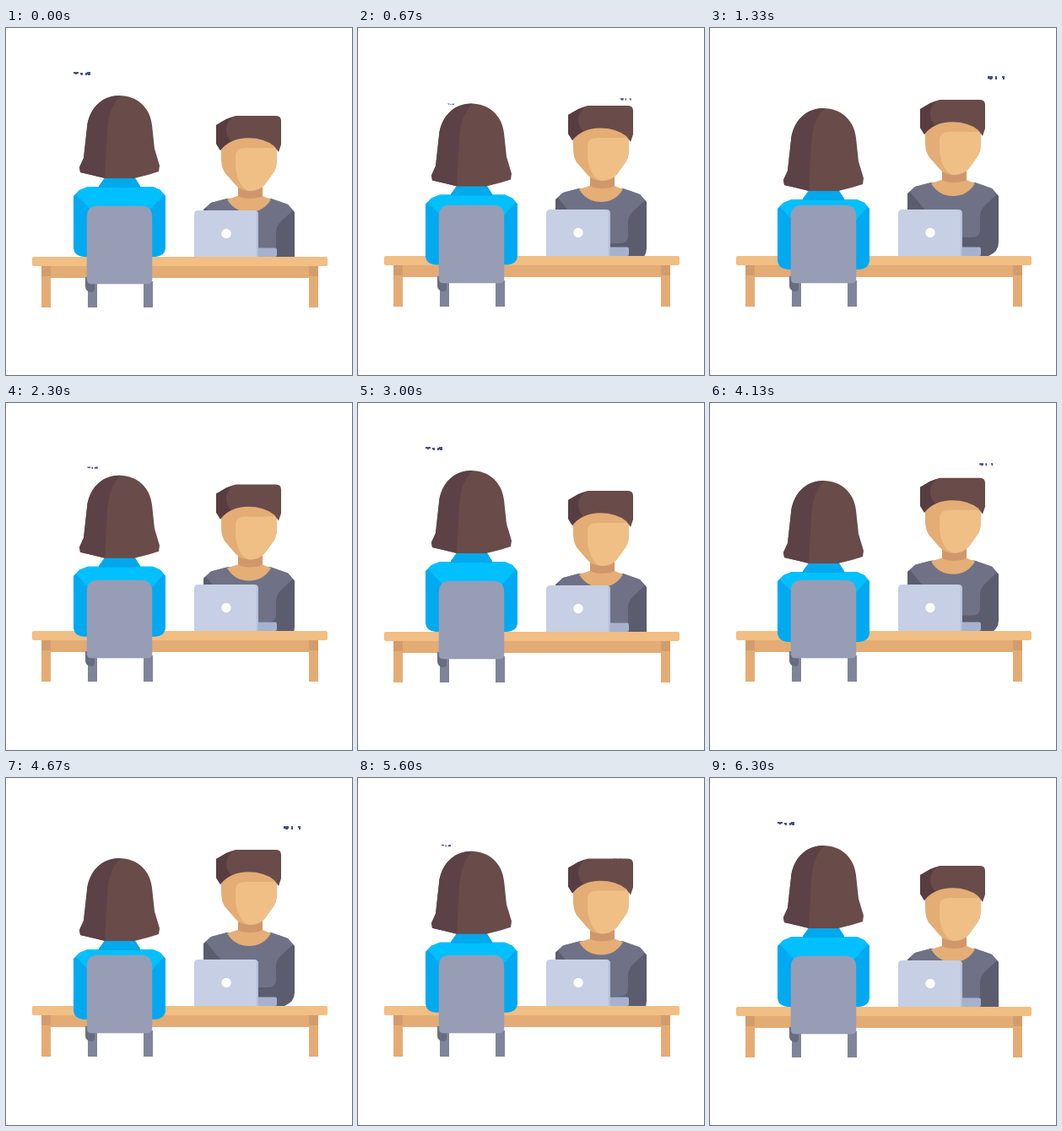
Animation, 410 px wide and 411 px high, one loop 6.66 s. Source, as an HTML page:

```html
<!DOCTYPE html>
<html lang="en">
<head>
<meta charset="utf-8">
<title>Interview</title>
<style>
  html, body { margin: 0; height: 100%; overflow: hidden; background: #fff; }
  svg { display: block; width: 410px; height: 411px; }
</style>
</head>
<body>
<svg viewBox="0 0 410 411">
  <g id="womanWords" fill="#43508a">
    <path d="M80 52h6v2h-2v1h-2v-1h-2zM88 53h3v3h-2v-1h-1zM94 53h2v-1h4v4h-3v-1h-1v1h-2z"/>
  </g>
  <g id="manWords" fill="#43508a">
    <path d="M329 57h6v3h-1v1h-3v-1h-2zM338 57h2v4h-2zM346 57h3v4h-2v-2h-1z"/>
  </g>

  <g id="man">
    <path fill="#5b5d6f" d="M234 215L243 207 262 202H314L334 209 342 218V273Q342 284 330 289H234z"/>
    <path fill="#6f7287" d="M243 207L262 202H314L334 209 340 216 325 230Q320 235 320 243V258Q320 267 310 267H256V240Q256 234 250 229L237 213z"/>
    <path fill="#e5ae76" d="M262 203L274 199H304L314 203Q305 218 288 218T262 203z"/>
    <path fill="#d0976b" d="M275 180H304V199Q299 202 289 202T275 199z"/>
    <path fill="#e3ad75" d="M255 140Q258 128 288 128T321 140V155Q321 166 317 171L307 185Q300 193 289 193T272 186L259 171Q255 164 255 155z"/>
    <path fill="#efbf85" d="M272 152Q272 142 283 142H321V155Q321 166 317 171L307 185Q300 193 289 193 280 191 276 181 272 172 272 162z"/>
    <path fill="#694b49" d="M249 115L261 108 272 104H320Q326 104 326 110V138L323 147 318 140Q306 130.300 287 130.300 266 130.300 254 145L249 137z"/>
    <path fill="#573d41" d="M249 115L261 108 269 105Q260 113 261 122 262 130 267 134 259 138 254 145L249 137z"/>
  </g>

  <g class="furniture">
    <path fill="#e3ac74" d="M42 282H370V331H359V296H53V331H42z"/>
    <path fill="#d29d6c" d="M42 282H53V294H42zM359 282H370V294H359z"/>
    <rect fill="#f1be83" x="31" y="271" width="350" height="11" rx="2"/>
    <rect fill="#a6b1cd" x="290" y="260.500" width="31" height="10.500" rx="2"/>
    <path fill="#c6cfe3" d="M223 271V221Q223 216 228 216H294Q299 216 299 221V271z"/>
    <path fill="#b4bed7" d="M297 217Q299 218 299 221V271H297z"/>
    <circle fill="#fff" cx="261" cy="243.500" r="5.700"/>
  </g>

  <g id="woman">
    <path fill="#00a9f0" d="M80 199L87 192 97 188H174L183 192 189 199V261Q188 270 177 271H92Q81 270 80 261z"/>
    <path fill="#00c0ff" d="M83 197L87 192 97 188H174L183 192 187 197 170 216H101z"/>
    <path fill="#00a8ec" d="M118 176H152L159 187V189H110V187z"/>
    <path fill="#694b49" d="M134 80C156 80 171 95 173 115L176 143 182 163 181 170 168 174 152 178H118L101 174 88 171 87 165 92 154 96 118C98 97 112 80 134 80z"/>
    <path fill="#5c4146" d="M136 80C126 89 121 103 120 122L117 178 101 174 88 171 87 165 92 154 96 118C98 97 112 80 136 80z"/>
  </g>

  <g class="furniture">
    <path fill="#7f849b" d="M97 300H108V331H97zM163 300H174V331H163z"/>
    <path fill="#686c80" d="M94 295H105V310Q104 313 101 313 94 312 94 306z"/>
    <path fill="#979db5" stroke="#979db5" stroke-opacity=".5" d="M96 224Q96 211 109 211H160Q173 211 173 224V298Q173 303 168 303H101Q96 303 96 298z"/>
  </g>
</svg>
<script>
  const CYCLE = 3330, MOVE = 1000, SWAP = 340, RETURN = 1980;
  const byId = id => document.getElementById(id);
  const furniture = document.querySelectorAll('.furniture');

  // Cubic Bezier (.25, 0, .13, 1), solved for x by bisection
  function ease(x) {
    let lo = 0, hi = 1, s = 0.5;
    for (let i = 0; i < 20; i++) {
      s = (lo + hi) / 2;
      const bx = 0.75 * s * (1 - s) ** 2 + 0.39 * s * s * (1 - s) + s ** 3;
      if (bx < x) lo = s; else hi = s;
    }
    return s * s * (3 - 2 * s);
  }

  const progress = (t, start) => Math.min(1, Math.max(0, (t - start) / MOVE));
  const shift = (el, y) => el.setAttribute('transform', `translate(0 ${y})`);
  const grow = (el, x, y, k) => el.setAttribute('transform',
    `translate(${x * (1 - k)} ${y * (1 - k)}) scale(${k})`);

  // The furniture jolts by a pixel while the people move
  function jolt(out, back) {
    if (back > 0) return back < 0.5 ? -1 : back < 0.8 ? 1 : 0;
    return out < 0.03 ? 0 : out < 0.25 ? 1 : -1;
  }

  function draw(now) {
    const t = now % CYCLE;
    const out = progress(t, SWAP), back = progress(t, RETURN);
    const p = ease(out) - ease(back);
    shift(byId('woman'), 15 * p);
    shift(byId('man'), -19 * p);
    grow(byId('womanWords'), 122, 112, 1 - p);
    grow(byId('manWords'), 281, 127, p);
    furniture.forEach(el => shift(el, jolt(out, back)));
  }

  const start = performance.now();
  function loop() {
    draw(performance.now() - start);
    requestAnimationFrame(loop);
  }
  loop();
</script>
</body>
</html>
```
